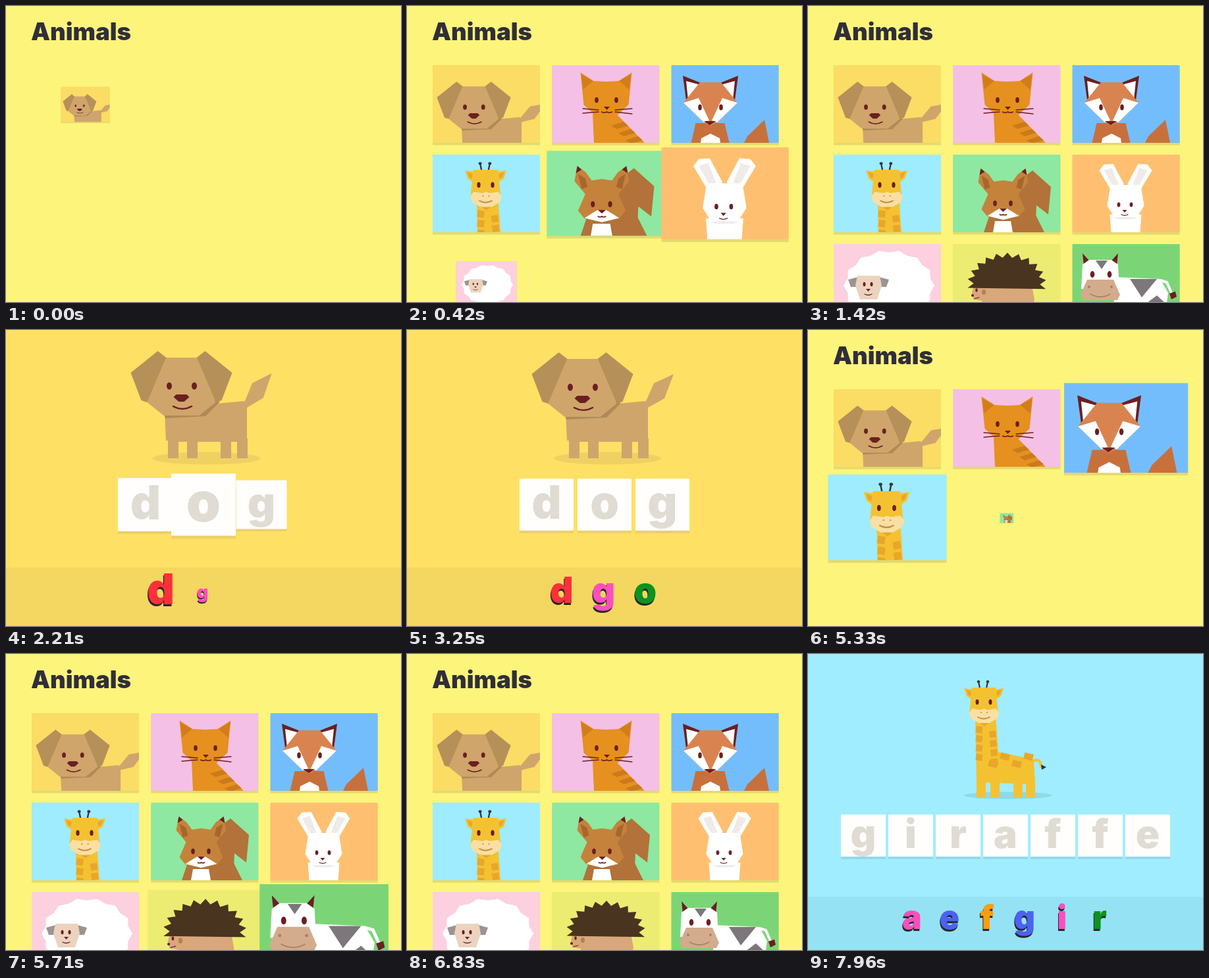
An HTML page for the animation above (8000 ms loop, 600 by 450 pixels).

```html
<!DOCTYPE html>
<html lang="en">
<head>
<meta charset="utf-8">
<title>Animals</title>
<style>
html, body { margin: 0; width: 100%; height: 100%; overflow: hidden; background: #fcf47b; }
svg { display: block; width: 100vw; height: 100vh; }
text { font-family: Inter, "Open Sans", sans-serif; font-weight: 900; }
</style>
</head>
<body>
<svg id="stage" viewBox="0 0 600 450"></svg>
<script>
const DARK = '#6b1f22', INK = '#302e38';
const LOOP = 8000, DOG_IN = 2020, GRID_AGAIN = 5040, GIRAFFE_IN = 7080;
const POP_TIME = 214, STAGGER = 69;

const times = (n, make) => Array.from({ length: n }, (_, i) => make(i));
const poly = (fill, points) => `<polygon fill="${fill}" points="${points}"/>`;
const oval = (fill, x, y, rx, ry = rx) => `<ellipse fill="${fill}" cx="${x}" cy="${y}" rx="${rx}" ry="${ry}"/>`;
const rect = (fill, x, y, w, h, extra = '') => `<rect fill="${fill}" x="${x}" y="${y}" width="${w}" height="${h}" ${extra}/>`;
const line = (color, d, width = 1.5) => `<path d="${d}" fill="none" stroke="${color}" stroke-width="${width}" stroke-linecap="round"/>`;
const group = (name, body, extra = '') => `<g class="${name}" ${extra}>${body}</g>`;

// Shapes symmetric about x = cx are given by their left half, x relative to cx
const side = (cx, half, sign) => half.split(' ').map(p => {
  const [x, y] = p.split(',').map(Number);
  return `${cx + sign * x},${y}`;
});
const mirror = (fill, cx, half) => poly(fill, [...side(cx, half, 1), ...side(cx, half, -1).reverse()].join(' '));
const pair = (fill, cx, half) => [1, -1].map(sign => poly(fill, side(cx, half, sign).join(' '))).join('');
const eyes = (cx, gap, y, rx = 2.8, ry = 4.2) => oval(DARK, cx - gap, y, rx, ry) + oval(DARK, cx + gap, y, rx, ry);
const smile = (cx, y, w, color = DARK, width = 1.5) => line(color, `M${cx - w} ${y}q${w} ${w * 0.55} ${2 * w} 0`, width);
const nose = (cx, y, w, h) => mirror(DARK, cx, `${-w},${y} 0,${y + h}`);
const legs = (fill, xs, y, w, h) => xs.map(x => rect(fill, x, y, w, h)).join('');

// Zigzag along an elliptic arc, angles in degrees
function jagged(fill, cx, cy, rx, ry, spikes, depth, from, to) {
  const points = times(2 * spikes + 1, i => {
    const a = (from + (to - from) * i / (2 * spikes)) * Math.PI / 180;
    const r = i % 2 ? 1 - depth : 1;
    return `${cx + rx * r * Math.cos(a)},${cy + ry * r * Math.sin(a)}`;
  });
  return poly(fill, points.join(' '));
}

// Animals drawn both full size and on a card
const dog = tailTurn =>
  group('tail', poly('#cfa56c', '360,115 375,81 405,67 391,104 366,118'), `transform="rotate(${tailTurn} 364 114)"`) +
  poly('#cfa56c', '241,125 243,168 264,170 366,170 366,117 362,108 320,112') +
  legs('#cfa56c', [246, 275, 326, 351], 165, 16, 30) +
  group('head',
    poly('#b08a54', '240,130 242,136 303,133 325,111 316,108') +
    mirror('#cfa56c', 266.5, '-23,44 -52,112 -27,132') +
    pair('#b69059', 266.5, '-36,34 -77,67 -61,109 -52,112 -23,44') +
    eyes(267, 19, 87, 4, 5.5) +
    mirror(DARK, 266.5, '-8,100 -12,104 -4,111') +
    smile(268, 118, 14, DARK, 2.4));

const spot = (x, y, w, turn) => rect('#e8a72a', x - w / 2, y - 5, w, 10, `transform="rotate(${turn} ${x} ${y})"`);
const giraffe = () =>
  line('#f4c231', 'M340 163Q354 157 354 171', 4) + poly('#333', '354,168 362,172 355,176') +
  poly('#f4c231', '254,95 285,95 289,149 327,157 343,163 345,198 256,195') +
  legs('#f4c231', [256, 277, 312, 331], 188, 14, 30) +
  times(8, i => spot(i % 2 ? 280 + i / 2 : 260, 115 + 7 * i, 10, i % 2 ? -8 : 8)).join('') +
  times(4, i => spot(281 + 18 * i, i % 2 ? 156 : 167, 14, 14)).join('') +
  group('head',
    line('#3c3436', 'M261 52L259 42M271 52L273 42', 2.2) + oval('#3c3436', 259, 42, 2.4, 2) + oval('#3c3436', 273, 42, 2.4, 2) +
    poly('#e8a72a', '248,96 287,96 268,110') +
    pair('#f4c231', 267, '-30,52 -16,54 -18,69 -26,64') +
    pair('#e8a72a', 267, '-27,54 -19,57 -20,64 -24,62') +
    mirror('#f4c231', 267, '-18,51 -22,92') +
    mirror('#f9dfa2', 267.5, '0,83 -5,85 -18,83 -23,90 -20,98 -8,105') +
    eyes(267, 10, 73, 2.5, 4) +
    oval('#d99b3e', 263, 89, 1.4, 1) + oval('#d99b3e', 272, 89, 1.4, 1) +
    smile(267, 96, 9, '#c98d45', 1.8));

// Card pictures
const cat = () =>
  poly('#e6901f', '282,164 284,208 361,208 318,164') +
  times(3, i => {
    const y = 182 + 11 * i, edge = 154 + y;
    return poly('#cb7a1b', `${edge - 26},${y} ${edge - 7},${y - 6} ${edge},${y} ${edge - 18},${y + 5}`);
  }).join('') +
  mirror('#e6901f', 302.5, '0,115 -19,114 -39,101 -34,150 -17,166') +
  pair('#d27d19', 302.5, '-38,104 -20,114 -35,127') +
  eyes(303, 15, 143) + nose(303.5, 153, 4.5, 5) + smile(299.5, 161, 4) + smile(307.5, 161, 4) +
  line(DARK, 'M267 156L291 158M267 163L291 161M316 158L342 156M316 161L342 164', 1.3);

const fox = () =>
  mirror('#c8703b', 460.5, '-22,178 -29,208') + poly('#c8703b', '512,208 517,198 543,173 550,208') +
  mirror('#fff', 461, '0,194 -14,201 -15,208') +
  pair(DARK, 461, '-42,106 -12,118 -37,143') +
  pair('#fff', 461, '-37,114 -15,120 -34,143') +
  mirror('#d98450', 461, '-16,116 -41,147 -11,176 0,182') +
  pair('#fff', 461, '-41,147 -18,140 -2,174 -10,177') +
  eyes(461, 16, 154, 2.8, 4.5) + nose(460, 175, 9, 6);

const squirrel = () =>
  poly('#b27239', '318,280 328,260 341,250 369,275 365,317 347,303 346,325 318,325') +
  poly('#b27239', '267,344 275,320 346,318 359,344') +
  mirror('#fff', 296, '-12,327 -15,344') +
  mirror('#c5823b', 296.5, '0,265 -14,267 -22,256 -34,247 -38,268 -23,286 -33,309 -24,320 0,325') +
  pair('#a7662e', 296.5, '-33,258 -23,264 -20,276 -28,279') +
  pair(DARK, 296.5, '-34,247 -28,252 -36,257') +
  mirror('#fff', 296.5, '0,308 -6,308 -24,319 0,325') +
  eyes(296, 12, 300) + nose(296.5, 308, 5.5, 5) + smile(294, 317, 2.7) + smile(299, 317, 2.7);

const rabbit = () =>
  pair('#fff', 482.5, '-40,250 -33,241 -19,240 -3,270 -8,283 -24,277') +
  pair('#f0ebe9', 482.5, '-33,250 -21,246 -11,271 -19,275') +
  mirror('#fff', 482.5, '-24,317 -22,344') +
  mirror('#f0ebe9', 482.5, '-19,320 -12,324') +
  mirror('#fff', 482.5, '-23,272 -28,304 -17,321') +
  eyes(481.5, 9.5, 302, 2.4, 3.5) + nose(481, 310, 3.5, 4) + smile(481, 317, 5, DARK, 1.2);

const sheep = () =>
  jagged('#fff', 123, 425, 69, 54, 14, 0.07, 0, 360) +
  pair('#9c9490', 92, '-31,416 -16,412 -16,427 -27,427') +
  mirror('#ecd3c0', 92, '-17,410 -20,425 -13,446') +
  eyes(91, 5.5, 423, 2, 3.2) + nose(91.5, 430, 3.5, 4) + smile(91.5, 438, 5.5, DARK, 1.3);

const hedgehog = () =>
  poly('#d9a77c', '256,412 273,425 340,425 344,446 337,480 262,480 264,448 251,446 249,435') +
  jagged('#49341f', 302, 422, 60, 47, 12, 0.16, 172, 370) +
  oval(DARK, 256, 432, 1.8, 2.8) + oval('#b67e54', 267, 435, 3, 4) +
  oval(DARK, 250, 440, 2) + line(DARK, 'M253 445L260 443', 1.2);

const cow = () =>
  line('#fff', 'M535 417L545 420L553 438', 4) + poly(DARK, '549,437 558,434 560,442 552,446') +
  poly('#fff', '465,412 535,415 547,436 541,480 465,480') +
  poly('#7d777c', '489,415 530,415 507,443') + poly('#7d777c', '514,452 530,440 543,452') +
  pair(DARK, 444, '-27,376 -17,387 -25,395') +
  mirror('#fff', 444, '-17,386 -27,393 -29,430') +
  mirror('#7d777c', 446, '-9,387 0,400') +
  mirror('#d3ab8d', 444, '-20,416 -30,439 -26,447') +
  eyes(445, 13, 408, 3.3, 5) +
  oval('#a88163', 427, 427, 2) + oval('#a88163', 461, 427, 2) + smile(444, 438, 15, '#a88163');

const cards = [
  ['#fbdc64', group('', dog(16), 'transform="translate(45 115) scale(.729) translate(-189 -34)"')],
  ['#f4c0e5', cat()], ['#74bdfd', fox()],
  ['#9eecfe', group('', giraffe(), 'transform="translate(119.5 272) scale(1.05) translate(-267 -73)"')],
  ['#8ee8a1', squirrel()], ['#fec070', rabbit()],
  ['#fcd0df', sheep()], ['#ecec72', hedgehog()], ['#7bd577', cow()]
].map(([color, art], i) => {
  const x = 39 + 181.3 * (i % 3), y = 90 + 136 * Math.floor(i / 3);
  return `<clipPath id="card${i}">${rect('#000', x, y, 163, 118)}</clipPath>` +
    group('pop', rect('#e4da6e', x, y + 4, 163, 117.5) + rect(color, x, y, 163, 118) +
      group('', art, `clip-path="url(#card${i})"`),
      `data-x="${x + 81.5}" data-y="${y + 60}" data-delay="${i * STAGGER}"`);
}).join('');

const letter = (ch, x, y, size, fill) => `<text x="${x}" y="${y}" font-size="${size}" fill="${fill}" text-anchor="middle">${ch}</text>`;

// A word scene: animal, blank tiles and a tray of coloured letters
function wordScene({ id, back, trayColor, trayY, shade, word, tile, tray, art }) {
  const tiles = [...word].map((ch, i) => {
    const x = tile.x + tile.step * i, cx = x + tile.w / 2;
    return group('pop', rect(shade, x, tile.y + 4, tile.w, tile.h) + rect('#fffefd', x, tile.y, tile.w, tile.h) +
      letter(ch, cx, tile.base, tile.size, '#e0dcd3'),
      `data-x="${cx}" data-y="${tile.y + tile.h / 2}" data-delay="${i * STAGGER}"`);
  }).join('');
  const letters = [...tray.text].map((ch, i) => {
    const x = tray.x + tray.step * i;
    return group('pop', letter(ch, x - 1, tray.base + 2.5, tray.size, '#29262a') + letter(ch, x, tray.base, tray.size, tray.colors[i]),
      `data-x="${x}" data-y="402" data-delay="${100 + i * STAGGER}"`);
  }).join('');
  return group('scene', rect(back, 0, 0, 600, 450) + rect(trayColor, 0, trayY, 600, 450 - trayY) + art + tiles + letters, `id="${id}"`);
}

const RED = '#fb303a', PINK = '#fb4fbe', GREEN = '#0d931f', BLUE = '#4b62f2', ORANGE = '#ff9e0d';
const stage = document.getElementById('stage');
stage.innerHTML =
  group('scene', rect('#fcf47b', 0, 0, 600, 450) +
    `<text x="38" y="52" font-size="36.5" fill="${INK}">Animals</text>` + cards, 'id="grid"') +
  wordScene({
    id: 'dog', back: '#fee064', trayColor: '#f3d760', trayY: 361, shade: '#ecd06a', word: 'dog',
    tile: { x: 171, y: 226, w: 82, h: 79, step: 88, size: 70, base: 287 },
    tray: { text: 'dgo', x: 235, step: 63.5, size: 55, base: 415, colors: [RED, PINK, GREEN] },
    art: oval('#efd163', 304.5, 195, 82, 9.5) + dog(0)
  }) +
  wordScene({
    id: 'giraffe', back: '#a0edff', trayColor: '#95e2f4', trayY: 369, shade: '#93d9e9', word: 'giraffe',
    tile: { x: 50, y: 244, w: 68, h: 64, step: 72, size: 60, base: 295 },
    tray: { text: 'aefgir', x: 158, step: 57, size: 50, base: 418, colors: [PINK, BLUE, ORANGE, BLUE, PINK, GREEN] },
    art: oval('#8fd9e8', 304, 215, 67, 5.5) + giraffe()
  });

const scenes = [...stage.querySelectorAll('.scene')];
const pops = new Map(scenes.map(s => [s.id, [...s.querySelectorAll('.pop')]]));

// Ease out with an overshoot to about 1.2
function popScale(ms) {
  const u = Math.min(1, ms / POP_TIME) - 1;
  return u <= -1 ? 0 : Math.max(0, 1 + u * u * (3.6 * u + 2.6));
}

function currentScene(t) {
  if (t < DOG_IN) return ['grid', -19];
  if (t < GRID_AGAIN) return ['dog', DOG_IN];
  if (t < GIRAFFE_IN) return ['grid', GRID_AGAIN + 10];
  return ['giraffe', GIRAFFE_IN];
}

const dogHead = stage.querySelector('#dog .head');
const dogTail = stage.querySelector('#dog .tail');
const giraffeHead = stage.querySelector('#giraffe .head');
const turns = (ms, period) => 2 * Math.PI * ms / period;

function draw() {
  const t = performance.now() % LOOP;
  const [id, start] = currentScene(t);
  for (const s of scenes) s.style.display = s.id === id ? '' : 'none';
  for (const el of pops.get(id)) {
    const { x, y, delay } = el.dataset;
    el.setAttribute('transform', `translate(${x} ${y}) scale(${popScale(t - start - delay)}) translate(${-x} ${-y})`);
  }
  dogHead.setAttribute('transform', `translate(0 ${-0.8 - 2 * Math.cos(turns(t - 4750, 2200))})`);
  dogTail.setAttribute('transform', `rotate(${9 + 11 * Math.sin(turns(t - 3250, 1100) - 2.19)} 364 114)`);
  giraffeHead.setAttribute('transform', `translate(0 ${0.8 - 0.8 * Math.cos(turns(t - 7960, 2200))})`);
  requestAnimationFrame(draw);
}
draw();
</script>
</body>
</html>
```
